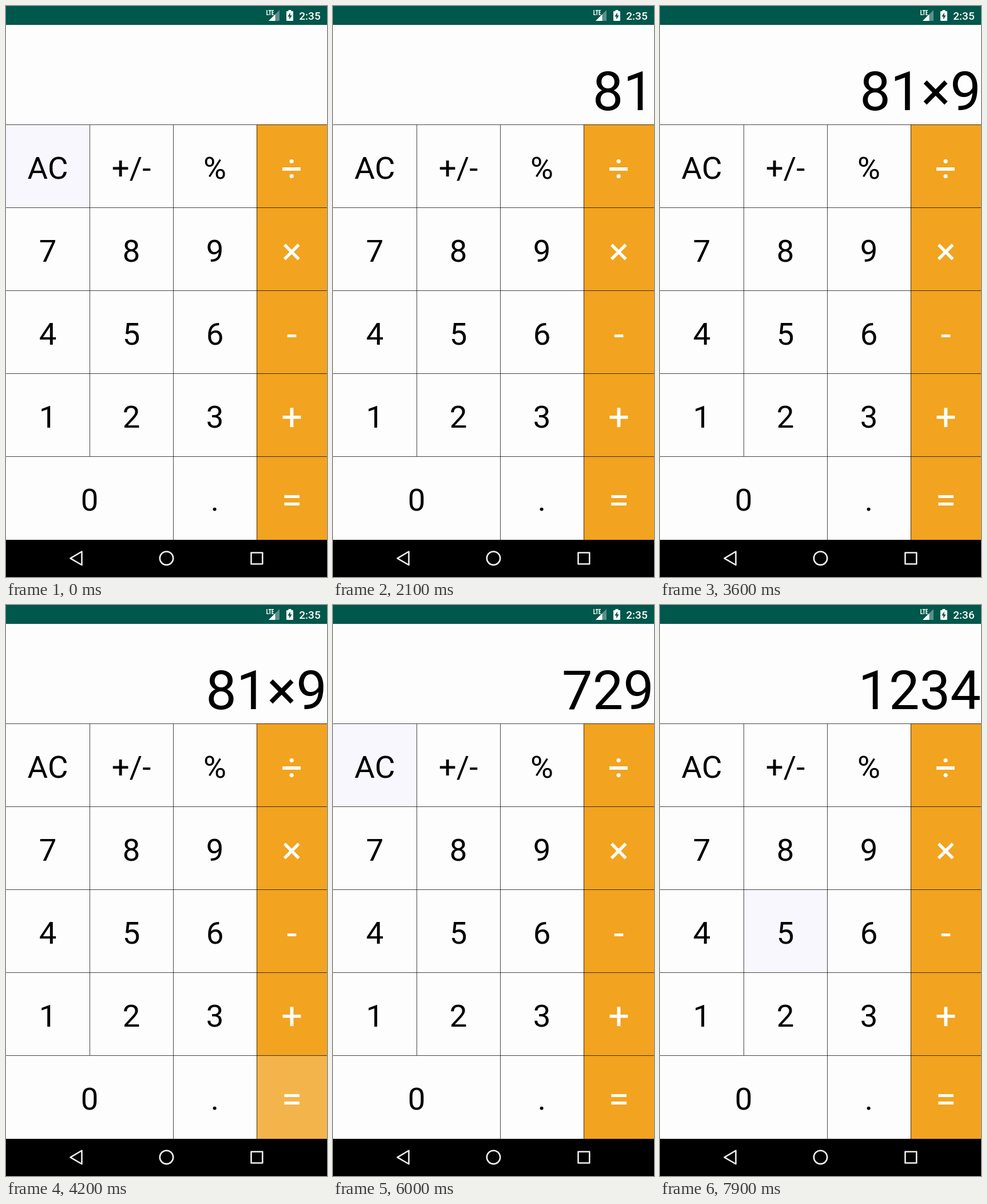
Animation, 561 px wide and 998 px high, one loop 8000 ms. Source, as an HTML page with a canvas:

```html
<!DOCTYPE html>
<html lang="en">
<head>
<meta charset="utf-8">
<title>Calculator</title>
<style>
html, body { margin: 0; width: 100%; height: 100%; overflow: hidden; background: #000; }
canvas { display: block; }
</style>
</head>
<body>
<canvas id="stage" width="561" height="998"></canvas>
<script>
const ctx = document.getElementById('stage').getContext('2d');
const W = 561, LOOP = 8000, FADE = 120;
const TOP = 207, ROW = 145, COL = 146, BOTTOM = 933;
const TEAL = '#00574b', PAPER = '#fdfdfd', ORANGE = '#f2a31f';
const LINE = 'rgba(0,0,0,.72)';

// Each key: label, column, row, columns spanned.
const keys = [
  ['AC', 0, 0], ['+/-', 1, 0], ['%', 2, 0], ['÷', 3, 0],
  ['7', 0, 1], ['8', 1, 1], ['9', 2, 1], ['×', 3, 1],
  ['4', 0, 2], ['5', 1, 2], ['6', 2, 2], ['-', 3, 2],
  ['1', 0, 3], ['2', 1, 3], ['3', 2, 3], ['+', 3, 3],
  ['0', 0, 4, 2], ['.', 2, 4], ['=', 3, 4]
].map(([label, col, row, span = 1]) => {
  const x = col * COL, y = TOP + row * ROW;
  return { label, x, y, w: Math.min(W, x + span * COL) - x, h: ROW, op: col === 3 };
});

// Each press: key, time down, time up, display after release.
const presses = [
  ['AC', -500, 200, ''],
  ['9', 300, 450, '9'],
  ['×', 600, 750, '9×'],
  ['9', 780, 1100, '9×9'],
  ['=', 1600, 2000, '81'],
  ['×', 2700, 3000, '81×'],
  ['9', 3300, 3500, '81×9'],
  ['=', 3650, 5600, '729'],
  ['AC', 5850, 6200, ''],
  ['1', 6600, 6800, '1'],
  ['2', 6950, 7100, '12'],
  ['3', 7250, 7400, '123'],
  ['4', 7550, 7700, '1234'],
  ['5', 7780, 8200, '12345']
];

function rect(x, y, w, h, color) {
  ctx.fillStyle = color;
  ctx.fillRect(x, y, w, h);
}

function text(str, x, y, size, color, align, weight = 400) {
  ctx.font = `${weight} ${size}px Roboto, sans-serif`;
  ctx.textAlign = align;
  ctx.fillStyle = color;
  ctx.fillText(str, x, y);
}

function trace(points, close) {
  ctx.beginPath();
  points.forEach(([x, y]) => ctx.lineTo(x, y));
  if (close) ctx.closePath();
}

function poly(points, color) {
  trace(points, true);
  ctx.fillStyle = color;
  ctx.fill();
}

function strokeLine(...points) {
  trace(points, false);
  ctx.stroke();
}

function drawStatus(t) {
  rect(0, 0, W, 33, TEAL);
  ctx.strokeStyle = '#fff';
  ctx.lineWidth = 1.5;
  ctx.lineJoin = 'miter';
  strokeLine([456, 7], [456, 15.2], [459.4, 15.2]);
  strokeLine([458.8, 7.8], [463.8, 7.8]);
  strokeLine([461.3, 7.8], [461.3, 16]);
  strokeLine([468, 7.8], [465.2, 7.8], [465.2, 15.2], [468, 15.2]);
  strokeLine([465.2, 11.4], [467.6, 11.4]);

  poly([[459, 26], [478, 26], [478, 7]], 'rgba(255,255,255,.35)');
  poly([[459, 26], [470.5, 26], [470.5, 14.5]], '#fff');

  ctx.fillStyle = '#fff';
  ctx.beginPath();
  ctx.roundRect(490, 9, 12, 17, 1.2);
  ctx.fill();
  rect(493.5, 7, 5, 3, '#fff');
  poly([[496.8, 11.5], [492.3, 18.5], [495.2, 18.5], [495.2, 23.5],
        [499.7, 16.5], [496.8, 16.5]], TEAL);

  text(t < 7400 ? '2:35' : '2:36', 549.8, 24, 19.1, '#fff', 'right', 500);
}

function drawKey(key, t) {
  const press = presses.find(([k, down, up]) => k === key.label && t >= down && t < up);
  rect(key.x, key.y, key.w, key.h + 1, key.op ? ORANGE : PAPER);
  if (press) {
    ctx.globalAlpha = Math.min(1, (t - press[1]) / FADE);
    rect(key.x, key.y, key.w, key.h + 1, key.op ? '#f3b44b' : '#f7f7fd');
    ctx.globalAlpha = 1;
  }
  const midX = key.x + key.w / 2, midY = key.y + 73;
  if (key.op) text(key.label, midX, midY + 25.5, 65.45, '#fff', 'center');
  else text(key.label, midX, midY + 22, 54.55, '#000', 'center');
}

function drawGrid() {
  for (let row = 0; row < 5; row++) rect(0, TOP + row * ROW, W, 1, LINE);
  for (let col = 1; col < 4; col++) {
    const end = col === 1 ? TOP + 4 * ROW : BOTTOM;
    rect(col * COL, TOP + 1, 1, end - TOP - 1, LINE);
  }
}

function drawNav() {
  rect(0, BOTTOM, W, 65, '#000');
  ctx.strokeStyle = '#eee';
  ctx.lineWidth = 2.6;
  ctx.lineJoin = 'round';
  trace([[112.5, 965.3], [132.5, 953.5], [132.5, 977]], true);
  ctx.stroke();
  ctx.beginPath();
  ctx.arc(280.5, 965.2, 11.7, 0, 2 * Math.PI);
  ctx.stroke();
  ctx.strokeRect(428.5, 955.5, 19.8, 19.8);
}

function draw(now) {
  const t = now % LOOP;
  const shown = presses.reduce((last, [, , up, value]) => t >= up ? value : last, '');
  rect(0, 33, W, BOTTOM - 33, PAPER);
  drawStatus(t);
  text(shown, W, 182, 95.45, '#000', 'right');
  keys.forEach(key => drawKey(key, t));
  drawGrid();
  drawNav();
}

const start = performance.now();
function tick() {
  draw(performance.now() - start);
  requestAnimationFrame(tick);
}
tick();
</script>
</body>
</html>
```
